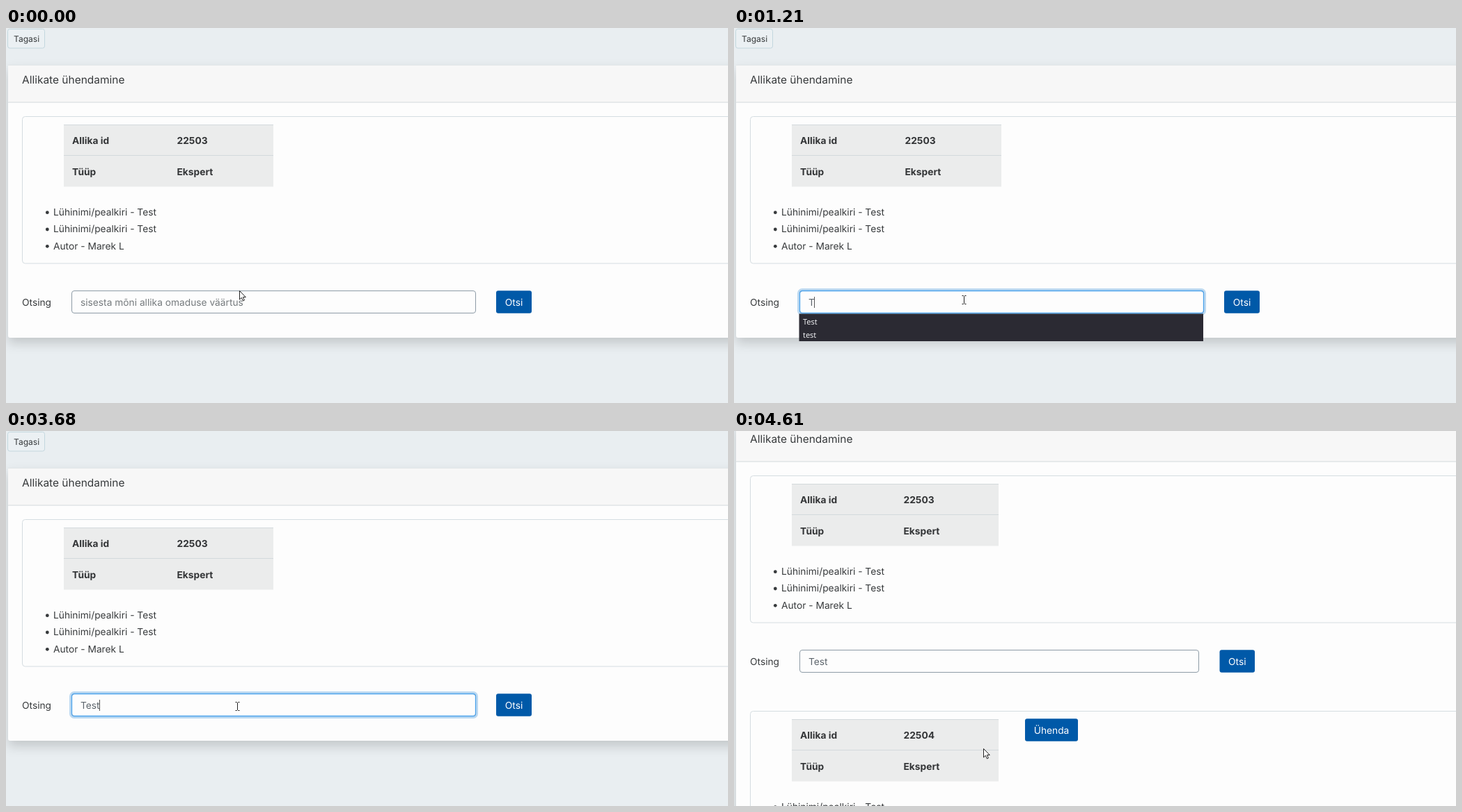
Write an HTML page that moves like this. It is 1037 px wide and 540 px high and loops after 5740 ms.

```html
<!DOCTYPE html>
<html lang="et">
<head>
<meta charset="utf-8">
<title>Allikate ühendamine</title>
<style>
  html, body { margin: 0; width: 100%; height: 100%; overflow: hidden; background: #e9eef1; }
  svg { display: block; }
  text { font: 13.76px Inter, sans-serif; fill: #373a3c; text-rendering: geometricPrecision; }
  .title { font-size: 15.48px; }
  .small { font-size: 12.04px; }
  .bold { font-weight: 700; fill: #333537; }
  .white { fill: #fff; text-anchor: middle; }
  .hint { fill: #757a7d; }
  .value { fill: #5d656c; }
  .option { font: 11px "Open Sans", sans-serif; fill: #fbfbfe; }
  .card { fill: #fdfdfd; filter: drop-shadow(0 8px 8px rgba(0, 0, 0, .16)); }
</style>
</head>
<body>
<svg id="stage" width="1037" height="540"></svg>
<script>
const LOOP = 5740, RESULTS = 4090, SCROLL = 4610;
const stage = document.getElementById('stage');
const pen = document.createElement('canvas').getContext('2d');
pen.font = '13.76px Inter, sans-serif';

const text = (x, y, s, cls = '') => `<text x="${x}" y="${y}" class="${cls}">${s}</text>`;
const rect = (x, y, w, h, attrs) => `<rect x="${x}" y="${y}" width="${w}" height="${h}" ${attrs}/>`;
const line = (x, y, w) => rect(x, y, w, 1, 'fill="#d3d9dc"');
const button = (x, y, w, label) =>
  rect(x, y, w, 32.5, 'rx="3" fill="#0059a8"') + text(x + w / 2, y + 21.5, label, 'white');

// Latest value whose start time has passed
const at = (t, steps) => steps.reduce((v, [start, next]) => t >= start ? next : v, steps[0][1]);

function entry(y, id, width) {
  const col = 83 + width / 2 + 12;
  const items = ['Lühinimi/pealkiri - Test', 'Lühinimi/pealkiri - Test', 'Autor - Marek L'];
  return rect(23.5, y + .5, 1100, 211.5, 'rx="4" fill="none" stroke="#d5dde1"') +
    rect(83, y + 12, width, 89.5, 'fill="#ebecec"') +
    line(83, y + 12, width) + line(83, y + 56, width) +
    text(95, y + 40, 'Allika id', 'bold') + text(col, y + 40, id, 'bold') +
    text(95, y + 85, 'Tüüp', 'bold') + text(col, y + 85, 'Ekspert', 'bold') +
    items.map((s, i) => {
      const base = y + 143 + i * 24.3;
      return `<circle cx="59.3" cy="${base - 4.3}" r="2.4" fill="#373a3c"/>` + text(68, base, s);
    }).join('');
}

function field(t, width) {
  const focus = at(t, [[0, 0], [400, .3], [470, .75], [530, 1],
    [RESULTS, .75], [4160, .3], [4230, 0]]);
  const value = at(t, [[0, ''], [1110, 'T'], [1500, 'Te'], [1810, 'Tes'], [2010, 'Test']]);
  const caret = at(t, [[0, 0], [400, 1], [1000, 0], [1110, 1], [1500, 0], [1610, 1],
    [2010, 0], [2090, 1], [2540, 0], [2680, 1], [RESULTS, 0]]);
  const box = (grow, attrs) =>
    rect(94.5 - grow, 378.5 - grow, width + 2 * grow, 32 + 2 * grow, attrs);
  return box(1.5, `rx="5" fill="none" stroke="#bcd9f1" stroke-width="4" opacity="${focus}"`) +
    box(0, 'rx="3.5" fill="#fdfdfd" stroke="#8d9ba6"') +
    box(0, `rx="3.5" fill="none" stroke="#4ba3ec" stroke-width="1.3" opacity="${focus}"`) +
    (value ? text(107, 400, value, 'value')
           : text(107, 400, 'sisesta mõni allika omaduse väärtus', 'hint')) +
    (caret ? rect(Math.round(107 + pen.measureText(value).width - .4), 387, 1, 16, 'fill="#555"') : '');
}

const dropdown = () => rect(93.5, 411.5, 580.5, 39.5, 'fill="#2b2a33"') +
  text(99, 426.5, 'Test', 'option') + text(99, 446, 'test', 'option');

function pointer(t) {
  let [x, y] = at(t, [[0, [335, 378]], [70, [333, 380]], [130, [331, 391]], [200, [330, 391]]]);
  let beam = t >= 130;
  if (t >= 3680) {
    const k = Math.min(8, Math.floor((t - 3680) / 68.75)) / 8;
    x = Math.round(332 + 26 * k);
    y = Math.round(396 + 61 * k * (2 - k));
    beam = y < 411;
  }
  const shape = beam
    ? '<path d="M-3-6H-1L0-5 1-6H3M0-5V5M-3 6H-1L0 5 1 6H3" fill="none" stroke="#222"/>'
    : '<path d="M0 0V12.5L2.8 9.8 4.9 14.4 6.9 13.5 4.9 9.1H8.8Z" fill="#fff" stroke="#222"/>';
  return `<g transform="translate(${x + .5} ${y + .5})">${shape}</g>`;
}

function scene(t) {
  const found = t >= RESULTS;
  const table = found ? 297 : 301;
  const page =
    rect(2.5, 1.5, 53, 27.5, 'rx="3" fill="#ebf0f3" stroke="#c3d7de"') +
    text(11, 20, 'Tagasi', 'small') +
    rect(3, 53, 1100, found ? 800 : 393, 'rx="3" class="card"') +
    rect(3, 53, 1100, 54, 'rx="3" fill="#f7f7f7"') +
    rect(3, 53, 1100, 1, 'fill="#e1e5e7"') + line(3, 106.5, 1100) +
    text(23, 80, 'Allikate ühendamine', 'title') +
    entry(127, 22503, table) +
    text(23, 400, 'Otsing') +
    field(t, found ? 573 : 580) +
    button(found ? 697.5 : 704, 378.3, found ? 50.5 : 51, 'Otsi') +
    (found ? entry(466, 22504, table) + button(418, 477.2, 76, 'Ühenda') : '') +
    (t >= 1210 && t < 2540 ? dropdown() : '');
  return `<g transform="translate(0 ${t >= SCROLL ? -63 : 0})">${page}</g>` + pointer(t);
}

let shown = '';
function draw() {
  const next = scene(performance.now() % LOOP);
  if (next !== shown) stage.innerHTML = shown = next;
  requestAnimationFrame(draw);
}
draw();
</script>
</body>
</html>
```
